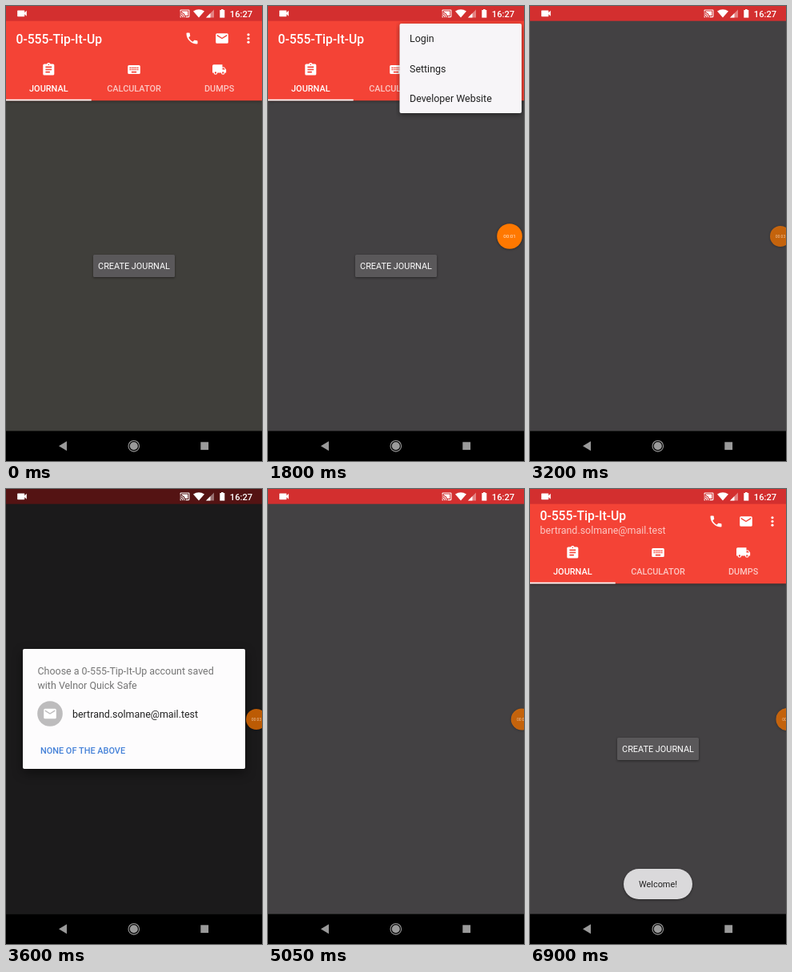
Animation, 320 px wide and 569 px high, one loop 7.1 s. Source, as an HTML page with a canvas:

```html
<!DOCTYPE html>
<html lang="en">
<head>
<meta charset="utf-8">
<title>Journal app login</title>
<style>
  html, body { margin: 0; width: 100%; height: 100%; overflow: hidden; background: #000; }
  canvas { display: block; width: 320px; height: 569px; }
</style>
</head>
<body>
<canvas id="stage"></canvas>
<script>
const W = 320, H = 569, LOOP = 7100, STEP = 50;
const BAR = 18.7, HEAD = 118.3, NAV = 531.6;
const TITLE = '0-555-Tip-It-Up';
const EMAIL = 'bertrand.solmane@mail.test';
const RED = [244, 67, 54], DARK_RED = [211, 47, 47], GREY = [67, 65, 67], WHITE = [255, 255, 255];

const canvas = document.getElementById('stage');
const ctx = canvas.getContext('2d');
const dpr = window.devicePixelRatio || 1;
canvas.width = W * dpr;
canvas.height = H * dpr;

const wheel = x => `M${x} 15.5a1.5 1.5 0 1 1 0 3 1.5 1.5 0 0 1 0-3z`;
const keys = [8, 11].map(y => [5, 8, 11, 14, 17].map(x => `M${x} ${y}h2v2h-2z`).join('')).join('');
const ICONS = {
  phone: 'M6.6 10.8c1.4 2.8 3.8 5.1 6.6 6.6l2.2-2.2c.3-.3.7-.4 1-.2 1.1.4 2.3.6 3.6.6.6 0 1 .4 1 1V20c0 .6-.4 1-1 1C10.6 21 3 13.4 3 4c0-.6.5-1 1-1h3.5c.6 0 1 .4 1 1 0 1.2.2 2.4.6 3.6.1.3 0 .7-.2 1z',
  mail: 'M20 4H4a2 2 0 0 0-2 2v12a2 2 0 0 0 2 2h16a2 2 0 0 0 2-2V6a2 2 0 0 0-2-2zM20 8l-8 5-8-5V6l8 5 8-5z',
  journal: 'M19 3h-4.2a3 3 0 0 0-5.6 0H5a2 2 0 0 0-2 2v14a2 2 0 0 0 2 2h14a2 2 0 0 0 2-2V5a2 2 0 0 0-2-2zM12 3a1 1 0 1 1 0 2 1 1 0 0 1 0-2zM14 17H7v-2h7zM17 13H7v-2h10zM17 9H7V7h10z',
  keyboard: 'M4 5h16a2 2 0 0 1 2 2v10a2 2 0 0 1-2 2H4a2 2 0 0 1-2-2V7a2 2 0 0 1 2-2zM8 15h8v2H8z' + keys,
  truck: 'M20 8h-3V4H3a2 2 0 0 0-2 2v11h2a3 3 0 0 0 6 0h6a3 3 0 0 0 6 0h2v-5zM19.5 9.5l2 2.5H17V9.5z' + wheel(6) + wheel(18),
  camera: 'M17 10.5V7a1 1 0 0 0-1-1H4a1 1 0 0 0-1 1v10a1 1 0 0 0 1 1h12a1 1 0 0 0 1-1v-3.5l4 4v-11z',
  cast: 'M1 18v3h3a3 3 0 0 0-3-3zM1 14v2a5 5 0 0 1 5 5h2a7 7 0 0 0-7-7zM1 10v2a9 9 0 0 1 9 9h2A11 11 0 0 0 1 10zM21 3H3a2 2 0 0 0-2 2v3h2V5h18v14h-7v2h7a2 2 0 0 0 2-2V5a2 2 0 0 0-2-2zM5 7v1.6a13 13 0 0 1 8.4 8.4H19V7z'
};
for (const name in ICONS) ICONS[name] = new Path2D(ICONS[name]);

const clamp = v => Math.max(0, Math.min(1, v));
const ramp = (t, a, b) => clamp((t - a) / (b - a));
const ease = p => p * p * (3 - 2 * p);
const span = (t, a, b, c, d) => ramp(t, a, b) * (1 - ramp(t, c, d));
const lerp = (a, b, p) => a + (b - a) * p;
const rgb = (c, a = 1) => `rgba(${c.map(Math.round).join(',')},${a})`;
const mix = (a, b, p) => a.map((v, i) => lerp(v, b[i], p));

function group(alpha, draw) {
  if (alpha <= 0) return;
  ctx.save();
  ctx.globalAlpha *= alpha;
  draw();
  ctx.restore();
}

function rect(x, y, w, h, fill) {
  ctx.fillStyle = fill;
  ctx.fillRect(x, y, w, h);
}

function card(x, y, w, h, r, fill, blur = 0, drop = 0) {
  ctx.save();
  ctx.shadowColor = 'rgba(0,0,0,.45)';
  ctx.shadowBlur = blur * dpr;
  ctx.shadowOffsetY = drop * dpr;
  ctx.fillStyle = fill;
  ctx.beginPath();
  ctx.roundRect(x, y, w, h, r);
  ctx.fill();
  ctx.restore();
}

function disc(x, y, r, fill) {
  ctx.fillStyle = fill;
  ctx.beginPath();
  ctx.arc(x, y, r, 0, Math.PI * 2);
  ctx.fill();
}

function poly(fill, ...pts) {
  ctx.fillStyle = fill;
  ctx.beginPath();
  pts.forEach(([x, y]) => ctx.lineTo(x, y));
  ctx.fill();
}

function text(str, x, y, size, fill, weight = 400, align = 'left') {
  ctx.font = `${weight} ${size}px Roboto, sans-serif`;
  ctx.textAlign = align;
  ctx.fillStyle = fill;
  ctx.fillText(str, x, y);
}

function icon(name, x, y, size, fill) {
  ctx.save();
  ctx.translate(x - size / 2, y - size / 2);
  ctx.scale(size / 24, size / 24);
  ctx.fillStyle = fill;
  ctx.fill(ICONS[name], 'evenodd');
  ctx.restore();
}

function mainScreen(t) {
  const back = mix([64, 63, 59], GREY, ramp(t, 0, 400));
  // the page lights up again once the login window has left
  const lit = t < 5800 ? 1 : ramp(t, 6000, 6200);
  const ink = mix([0, 0, 0], WHITE, lit);
  const full = rgb(ink), soft = rgb(ink, 0.7);

  rect(0, 0, W, NAV, rgb(back));
  ctx.save();
  ctx.shadowColor = 'rgba(0,0,0,.4)';
  ctx.shadowBlur = 4 * dpr;
  ctx.shadowOffsetY = dpr;
  rect(0, 0, W, HEAD, rgb(RED));
  ctx.restore();

  if (t >= 6300) {
    text(TITLE, 12.6, 38.5, 15.7, full, 500);
    text(EMAIL, 12.6, 56, 12.45, soft);
  } else {
    text(TITLE, 12.6, 46.5, 15.7, full, 500);
  }

  group(span(t, 1050, 1150, 1300, 1500), () =>
    disc(303, 40.5, 16 * ease(ramp(t, 1050, 1300)), 'rgba(255,255,255,.25)'));
  icon('phone', 232.5, 40.5, 18.7, full);
  icon('mail', 270, 40.5, 18.7, full);
  for (let i = -1; i < 2; i++) disc(303, 40.5 + i * 4.7, 1.6, full);

  [['journal', 'JOURNAL', 53.3], ['keyboard', 'CALCULATOR', 160], ['truck', 'DUMPS', 266.6]]
    .forEach(([name, label, x], i) => {
      icon(name, x, 79.5, 18.7, full);
      text(label, x, 107, 10.9, i ? soft : full, 500, 'center');
    });
  rect(0, 116.7, 106.7, 1.7, full);

  card(109, 311, 102, 28, 1.5, rgb(mix([56, 54, 56], [90, 88, 90], lit)), 3, 1);
  text('CREATE JOURNAL', 160, 329, 10.9, full, 400, 'center');
}

function menu(t) {
  const open = ease(ramp(t, 1350, 1650));
  const alpha = open * (1 - 0.4 * ramp(t, 2450, 2550)) * (1 - ramp(t, 2550, 2650));
  group(alpha, () => {
    ctx.beginPath();
    ctx.rect(160, 0, 160, lerp(30, 145, open));
    ctx.clip();
    const w = lerp(80, 152.5, open), h = lerp(20, 112, open);
    card(317 - w, 22, w, h, 2, '#f7f5f8', 6, 2);
    ctx.save();
    ctx.beginPath();
    ctx.rect(317 - w, 28, w, 37);
    ctx.clip();
    group(span(t, 2000, 2100, 2350, 2500), () =>
      disc(215, 46, 130 * ease(ramp(t, 2000, 2350)), 'rgba(0,0,0,.12)'));
    ctx.restore();
    group(ramp(open, 0.4, 1), () =>
      ['Login', 'Settings', 'Developer Website'].forEach((s, i) =>
        text(s, 177, 45.2 + i * 37.3, 12.45, '#212121')));
  });
}

function loginScreen(t) {
  let alpha, shift;
  if (t < 4000) {
    alpha = ramp(t, 2500, 2600);
    shift = 45 * Math.pow(1 - ramp(t, 2500, 2850), 3.1);
  } else {
    const p = ramp(t, 5950, 6200);
    alpha = 1 - p;
    shift = 45 * p * p;
  }
  group(alpha, () => {
    rect(0, shift, W, NAV, rgb(GREY));
    rect(0, shift, W, BAR, rgb(DARK_RED));
  });
}

function loading(t) {
  group(span(t, 2530, 2700, 2950, 3100), () => {
    card(18, 270, 284, 67, 2, '#444244', 12, 4);
    text('Loading...', 96, 307, 12.45, '#252425');
    const turn = (t - 2550) / 1000 * Math.PI * 2 - Math.PI / 2;
    ctx.strokeStyle = '#b0aeb0';
    ctx.lineWidth = 2.5;
    ctx.lineCap = 'round';
    ctx.beginPath();
    ctx.arc(60, 303, 14, turn, turn + 0.05 + 4 * ease(ramp(t, 2550, 2950)));
    ctx.stroke();
  });
}

function accounts(t) {
  group(span(t, 3250, 3400, 4750, 4950), () => {
    card(21, 200, 278, 150, 2, '#fdfcfd', 14, 5);
    text(`Choose a ${TITLE} account saved`, 39.5, 232, 12.45, '#757575');
    text('with Velnor Quick Safe', 39.5, 250, 12.45, '#757575');
    ctx.save();
    ctx.beginPath();
    ctx.rect(27, 253, 266, 56);
    ctx.clip();
    group(span(t, 4200, 4350, 4600, 4750), () => {
      rect(27, 253, 266, 56, '#e9e6e9');
      disc(122, 287, 160 * ramp(t, 4250, 4650), 'rgba(0,0,0,.045)');
    });
    ctx.restore();
    disc(55, 281, 15.8, '#bdbcbd');
    icon('mail', 55, 281, 18.7, '#fff');
    text(EMAIL, 83, 286.3, 12.45, '#212121');
    text('NONE OF THE ABOVE', 43, 331, 10.9, '#4481d8', 500);
  });
}

function toast(t) {
  group(ramp(t, 5970, 6270), () => {
    card(117, 475, 86, 38, 19, '#dad9db', 3, 1);
    text('Welcome!', 160, 498, 10.9, '#222', 400, 'center');
  });
}

function bubble(t) {
  const enter = ease(ramp(t, 50, 450));
  const dock = ease(ramp(t, 2100, 2400));
  const hide = ease(ramp(t, 4950, 5150));
  const x = lerp(338, 302, enter) + 11 * dock + 8.5 * hide;
  const r = lerp(15.8, 13, dock) + hide;
  group(enter * lerp(1, 0.72, dock), () => {
    card(x - r, 288 - r, 2 * r, 2 * r, r, '#ff7800', 3, 0.5);
    text(`00:0${Math.floor(t / 1000)}`, x, 290.2, lerp(6.2, 5, dock), '#ffe9d6', 400, 'center');
  });
}

function statusBar() {
  icon('camera', 20, 9.3, 15.5, '#fff');
  icon('cast', 223.5, 9.3, 13, '#fff');
  ctx.fillStyle = '#fff';
  ctx.beginPath();
  ctx.moveTo(241, 14.6);
  ctx.lineTo(234, 6.6);
  ctx.quadraticCurveTo(241, 2, 248, 6.6);
  ctx.fill();
  poly('rgba(255,255,255,.4)', [250, 14.5], [260, 14.5], [260, 4.5]);
  poly('#fff', [250, 14.5], [255.5, 14.5], [255.5, 9]);
  rect(267.3, 5, 6, 9.6, '#fff');
  rect(269, 4, 2.6, 1.2, '#fff');
  text('16:27', 279.8, 13.6, 11.2, '#fff', 500);
}

function navBar() {
  rect(0, NAV, W, H - NAV, '#000');
  const tone = '#9a9a9a';
  poly(tone, [66, 550.3], [76, 544.3], [76, 556.3]);
  disc(159.8, 550.3, 5, tone);
  ctx.strokeStyle = tone;
  ctx.lineWidth = 1.1;
  ctx.beginPath();
  ctx.arc(159.8, 550.3, 6.8, 0, Math.PI * 2);
  ctx.stroke();
  rect(243.3, 545.3, 9.8, 9.8, tone);
}

function draw(t) {
  ctx.setTransform(dpr, 0, 0, dpr, 0, 0);
  mainScreen(t);
  menu(t);
  const flash = span(t, 2450, 2550, 2600, 2750) + span(t, 5850, 6000, 6050, 6250);
  const strip = rgb(mix(DARK_RED, [229, 57, 53], flash));
  rect(0, 0, W, BAR, strip);
  loginScreen(t);
  if (flash) rect(0, 0, W, BAR, strip);
  const dim = 0.6 * Math.max(span(t, 2560, 2720, 2950, 3130), span(t, 3230, 3390, 4750, 4950));
  rect(0, 0, W, NAV, `rgba(0,0,0,${dim})`);
  loading(t);
  accounts(t);
  toast(t);
  navBar();
  statusBar();
  bubble(t);
}

const start = performance.now();
function tick() {
  const t = (performance.now() - start) % LOOP;
  draw(Math.floor(t / STEP) * STEP);
  requestAnimationFrame(tick);
}
tick();
</script>
</body>
</html>
```
